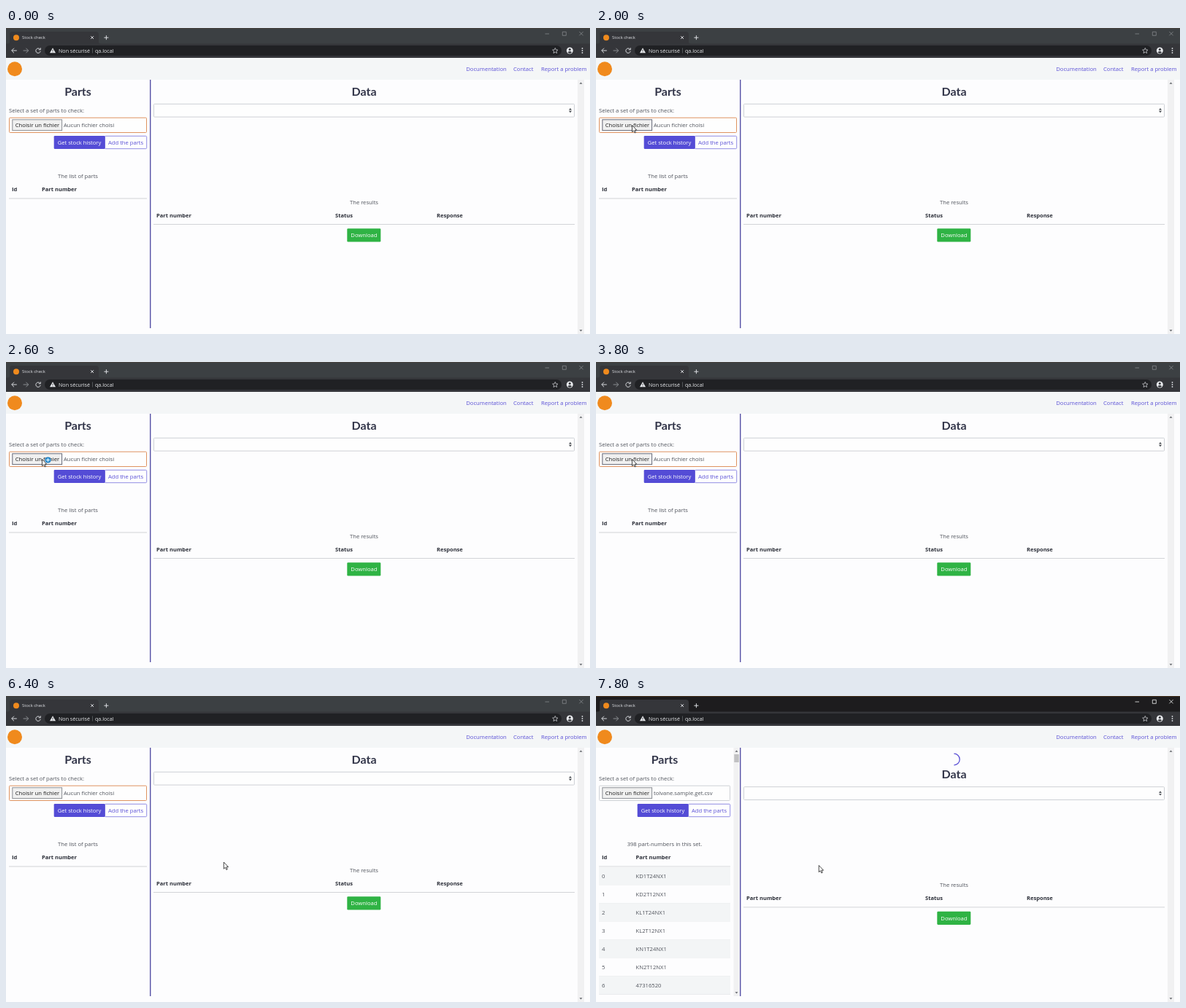
These frames come from a looping animation (800 px wide and 420 px high, 8000 ms). An HTML page:

```html
<!DOCTYPE html>
<html lang="en">
<head>
<meta charset="utf-8">
<title>Stock check</title>
<style>
  html, body { margin: 0; width: 100%; height: 100%; overflow: hidden; background: #fdfdfe; }
  svg { display: block; width: 100%; height: 100%; }
  text { font: 7.65px "Open Sans", "Noto Sans", sans-serif; fill: #50545c; white-space: pre; }
  .bold { font-weight: 700; font-size: 7.55px; fill: #2b2e38; }
  .title { font: 700 16px Lato, "Open Sans", sans-serif; fill: #33364a; }
  .link { fill: #5a50d6; }
  .tab { font-size: 5.9px; fill: #dfe1e5; }
  .url { font-size: 7.1px; fill: #e8eaed; }
  .white { fill: #fff; }
  .dark { fill: #1c1c1c; }
  .icon { fill: none; stroke: #dadce0; stroke-width: 1; }
</style>
</head>
<body>
<svg id="stage" viewBox="0 0 800 420"></svg>
<script>
const LOOP = 8000, STEP = 200;
const FILE = "tolvane.sample.get.csv";

const rect = (x, y, w, h, fill, more = "") =>
  `<rect x="${x}" y="${y}" width="${w}" height="${h}" fill="${fill}" ${more}/>`;
const box = (x, y, w, h, stroke, fill = "#fff", more = "") =>
  rect(x, y, w, h, fill, `stroke="${stroke}" ${more}`);
const path = (d, more = 'class="icon"') => `<path d="${d}" ${more}/>`;
const text = (x, y, s, cls = "", anchor = "start", id = "") =>
  `<text x="${x}" y="${y}" class="${cls}" text-anchor="${anchor}" id="${id}">${s}</text>`;
const mid = (x, y, s, cls) => text(x, y, s, cls, "middle");
const disc = (x, y, r, fill) => `<circle cx="${x}" cy="${y}" r="${r}" fill="${fill}"/>`;
const group = (id, body, more = "") => `<g id="${id}" ${more}>${body}</g>`;

function scrollbar(x, w, top, bottom) {
  const c = x + w / 2, fill = 'fill="#606368"';
  return rect(x, top, w, bottom - top, "#f1f1f2") +
    path(`M${c - 2} ${top + 5.8}l2 -2.2 2 2.2z`, fill) +
    path(`M${c - 2} ${bottom - 5.8}l2 2.2 2 -2.2z`, fill);
}

function browser() {
  return rect(0, 0, 800, 22, "#3c4043", 'id="strip"') +
    rect(0, 0, 800, 1, "#45413d", 'id="accent"') +
    path("M2 22q3 0 3 -3v-10q0 -4 4 -4h114q4 0 4 4v10q0 3 3 3z", 'fill="#35363a"') +
    rect(0, 21.5, 800, 19.5, "#35363a") +
    disc(14, 13.2, 4, "#f08a1d") +
    text(22, 15.4, "Stock check", "tab") +
    path("M116.2 11.2l3.8 3.8m0 -3.8l-3.8 3.8M134.4 13.2h6m-3 -3v6") +
    group("controls", path("M738.5 8h5.5M762.3 5.3h5v5h-5zM785.4 5.1l5.2 5.2m0 -5.2l-5.2 5.2", ""),
      'fill="none" stroke-width=".8"') +
    rect(53, 24, 708, 14, "#202124", 'rx="7"') +
    path("M14.8 31h-7m3.2 -3.3l-3.3 3.3 3.3 3.3") +
    path("M23.6 31h7m-3.2 -3.3l3.3 3.3 -3.3 3.3", 'class="icon" style="stroke:#8a8d91"') +
    path("M46.6 29.2a3.2 3.2 0 1 0 .6 2.6M47.3 27.3v2.5h-2.5") +
    path("M64 27.3l4 7h-8z", 'fill="#e8eaed"') +
    path("M64 29.7v2.2m0 .7v.9", 'stroke="#202124" stroke-width=".8"') +
    text(72, 33.7, "Non sécurisé", "url") +
    rect(118, 27.5, .7, 7, "#6a6d71") +
    text(122, 33.7, "qa.local", "url") +
    path("M752.3 27.4l1.1 2.5 2.6 .2 -2 1.8 .6 2.6 -2.3 -1.4 -2.3 1.4 .6 -2.6 -2 -1.8 2.6 -.2z",
      'class="icon" style="stroke-width:.7"') +
    disc(772.3, 31, 4.5, "#e8eaed") + disc(772.3, 29.4, 1.5, "#35363a") +
    path("M769.5 33.4q2.8 -2.6 5.6 0q-2.8 2.6 -5.6 0", 'fill="#35363a"') +
    [28, 31, 34].map(y => disc(789.5, y, .9, "#dadce0")).join("");
}

function header() {
  return rect(0, 41, 800, 30, "#f4f6f7") + disc(12, 56.2, 10, "#f08a1d") +
    text(630.3, 59, "Documentation", "link") +
    text(695, 59, "Contact", "link") +
    text(795.7, 59, "Report a problem", "link", "end");
}

function partRows() {
  const codes = [];
  for (const kind of ["KD", "KL", "KN"])
    for (const size of ["1T24", "2T12"]) codes.push(kind + size + "NX1");
  codes.push("47316520");
  return codes.map((code, i) => {
    const y = 234.5 + 25 * i;
    return rect(4, y, 180, 25, i % 2 ? "#fdfdfe" : "#f3f5f6") +
      rect(4, y + 24.5, 180, .6, "#e0e3e6") +
      text(8, y + 15.2, i) + text(54.5, y + 15.2, code);
  }).join("");
}

// The panel is narrower once its scrollbar shows.
function parts(loaded) {
  const right = loaded ? 184 : 193, c = (4 + right) / 2, split = right - 57.7;
  return mid(c, 92.7, "Parts", "title") +
    text(4, 116, "Select a set of parts to check:") +
    box(4.5, 123.2, right - 5, 20.3, loaded ? "#ced1d6" : "#df9360", "#fefefe", 'rx="1"') +
    box(8.8, 125.8, 67.8, 14.8, "#8b8e94", "#f0f0f0", loaded ? "" : 'id="choose"') +
    text(12.8, 135.9, "Choisir un fichier", "dark") +
    text(79, 135.9, loaded ? FILE : "", "", "start", loaded ? "" : "file") +
    box(split, 148.3, 57.4, 17.4, "#7770dd", "#fefefe", 'rx="1.3" stroke-width=".8"') +
    rect(split - 69.6, 148, 70, 18, "#544cd6", 'rx="1.3"') +
    mid(split - 34.8, 159.9, "Get stock history", "white") +
    mid(split + 28.8, 159.9, "Add the parts", "link") +
    mid(c, 205.7, loaded ? "398 part-numbers in this set." : "The list of parts") +
    text(8, 224.2, "Id", "bold") +
    text(loaded ? 54.5 : 49, 224.2, "Part number", "bold") +
    rect(4, 233.5, right - 4, 1, "#d2d4d8") +
    (loaded ? partRows() + scrollbar(188.5, 8, 71, 412) + rect(189.3, 80, 6.6, 11, "#c1c1c3") : "");
}

function data() {
  return mid(490.5, 92.7, "Data", "title") +
    box(202.5, 104.3, 576, 17.8, "#ced1d6", "#fefefe", 'rx="1"') +
    path("M771 112.5l2 -2.4 2 2.4zM771 113.8l2 2.4 2 -2.4z", 'fill="#43474d"') +
    mid(490.5, 241.7, "The results") +
    text(206, 260, "Part number", "bold") +
    text(451, 260, "Status", "bold") +
    text(590, 260, "Response", "bold") +
    rect(202, 269, 577, 1, "#d2d4d8") +
    rect(467.3, 275.3, 46, 18.2, "#2fb344", 'rx="1.3"') +
    mid(490.4, 287.2, "Download", "white");
}

const stage = document.getElementById("stage");
stage.innerHTML = rect(0, 0, 800, 420, "#fdfdfe") + browser() + header() +
  group("empty", parts(false)) + group("full", parts(true)) +
  rect(197, 71, 1.4, 341, "#5651a6") +
  group("data", data()) +
  path("M482.6 87a7.8 7.8 0 0 1 15.6 0", 'id="spinner" fill="none" stroke="#5a50d6" stroke-width="1.3"') +
  scrollbar(783, 9, 71, 420) +
  group("cursor",
    path("M0 0v9.2l2.1 -1.9 1.5 3.2 1.4 -.7 -1.4 -3.1h2.7z", 'fill="#fff" stroke="#111" stroke-width=".75"') +
    `<circle id="busy" cx="8" cy="1" r="3.2" fill="#a9d8f5" stroke="#1b7fc4" stroke-width="1.7"/>`);

const el = Object.fromEntries([...stage.querySelectorAll("[id]")].map(n => [n.id, n]));
const show = (node, on) => node.setAttribute("display", on ? "inline" : "none");

// time, x, y
const track = [
  [1200, 180, 228], [1800, 49.5, 133.5], [3800, 49.5, 133.5], [4200, 498, 154],
  [4800, 131.5, 90], [5000, 147, 84], [6000, 321, 238], [6200, 100.5, 87],
  [6400, 298.3, 228], [6600, 298.3, 228], [6800, 305.3, 232.5], [LOOP, 305.3, 232.5]
];

function cursorAt(t) {
  const i = Math.max(1, track.findIndex(k => k[0] >= t));
  const [t0, x0, y0] = track[i - 1], [t1, x1, y1] = track[i];
  const p = (t - t0) / (t1 - t0);
  return [x0 + (x1 - x0) * p, y0 + (y1 - y0) * p];
}

function draw(time) {
  const t = Math.floor((time % LOOP) / STEP) * STEP;
  const active = t >= 6800 || (t >= 2200 && t < 2600);
  const loading = t >= 7000, loaded = t >= 7600;
  const hover = t >= 1800 && t < 4000;

  el.strip.setAttribute("fill", active ? "#1d1c1e" : "#3c4043");
  el.accent.setAttribute("fill", active ? "#4a3420" : "#45413d");
  el.controls.setAttribute("stroke", active ? "#f1f1f1" : "#85888c");
  el.choose.setAttribute("stroke", hover ? "#666a78" : "#8b8e94");
  el.file.textContent = t >= 6800 ? FILE : "Aucun fichier choisi";
  show(el.empty, !loaded);
  show(el.full, loaded);
  el.data.setAttribute("transform", `translate(0 ${loading ? 20.4 : 0})`);
  show(el.spinner, loading);
  el.spinner.setAttribute("transform", `rotate(${(t - 7200) * 0.15} 490.4 87)`);
  show(el.cursor, t >= 1200);
  show(el.busy, t >= 2600 && t < 3200);
  el.cursor.setAttribute("transform", `translate(${cursorAt(Math.max(t, 1200))})`);
}

const start = performance.now();
(function tick() {
  draw(performance.now() - start);
  requestAnimationFrame(tick);
})();
</script>
</body>
</html>
```
